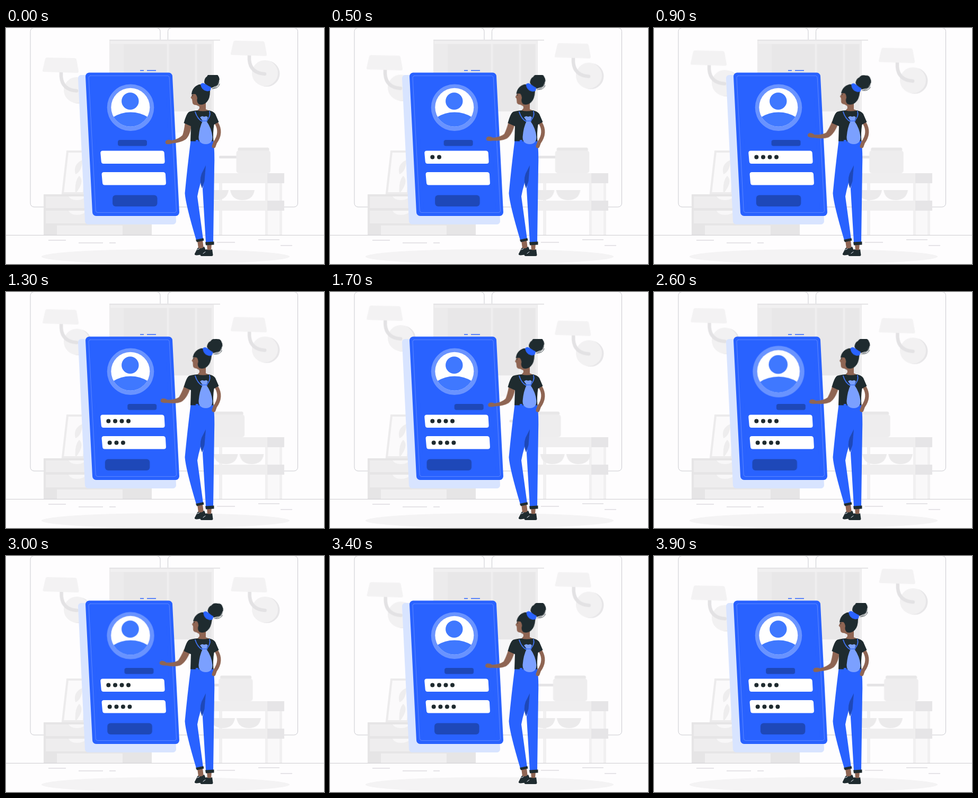
An HTML page without scripts that plays this animation: 600x447 px, repeating every 4000 ms.

```html
<!DOCTYPE html>
<html lang="en">
<head>
<meta charset="utf-8">
<title>Sign-in illustration</title>
<style>
  html, body { margin: 0; width: 100%; height: 100%; overflow: hidden; background: #fefdfe; }
  svg { display: block; width: 100%; height: 100%; }
  :root { --blue: #2962ff; --navy: #1e48b8; --ink: #1f2b2f; --skin: #8f6553; }

  .slide, .bow, .arm, .head, .bun {
    animation: 2s cubic-bezier(.37, 0, .63, 1) infinite alternate;
  }
  .slide { animation-name: slide; }
  .bow { animation-name: bow; animation-duration: 1s; }
  .arm, .head, .bun { animation-name: turn; animation-duration: 1s; }
  .arm { --turn: 16.6deg; transform-origin: 346px 172px; }
  .head { --turn: 7deg; transform-origin: 370px 150px; }
  .bun { --turn: 4deg; transform-origin: 379px 112px; }
  .avatar { transform-origin: 235px 150.8px; animation: pulse 4s ease-in-out infinite; }

  @keyframes slide { to { transform: translate(var(--x, 0px), var(--y, 0px)); } }
  @keyframes bow { to { transform: translateX(1.5px); } }
  @keyframes turn { to { transform: rotate(var(--turn)); } }
  @keyframes pulse { 0%, 52.5%, 77.5%, 100% { transform: scale(1); } 65% { transform: scale(1.1); } }

  .blue { fill: var(--blue); }
  .navy { fill: var(--navy); }
  .ink { fill: var(--ink); }
  .skin { fill: var(--skin); }
  .line { fill: none; stroke-linecap: round; stroke-linejoin: round; }
</style>
</head>
<body>
<svg viewBox="0 0 600 447" preserveAspectRatio="none">
  <defs>
    <g id="lamp">
      <circle cx="492" cy="86.500" r="24.500" fill="#e7e6e8"/>
      <circle cx="488.500" cy="85.500" r="24.500" fill="#f2f1f2"/>
      <g class="bow">
        <path class="line" d="M459 51V60Q461 85 488 87" stroke="#e3e2e4" stroke-width="6.500"/>
        <path d="M432 24L484 25Q487 25 488 28L492 50Q492 53 489 53L427 51Q423 51 424 48L429 26Q430 24 432 24Z" fill="#f3f2f3"/>
      </g>
    </g>
    <path id="bowl" d="M0 0H46Q43 19 23 19Q3 19 0 0Z" fill="#ebeaeb"/>
    <path id="field" d="M4.500 0H116Q120.500 0 120.700 4.500L121.600 20Q121.800 24.500 117.500 24.500H6Q2 24.500 1.700 20L.3 4.500Q0 0 4.500 0Z" fill="#fff"/>
    <clipPath id="disc"><circle cx="234.800" cy="150.300" r="36.500"/></clipPath>
    <clipPath id="top"><path d="M320 89H440V447H320Z"/></clipPath>
  </defs>

  <!-- room -->
  <g fill="#fefdfe" stroke="#cacacf">
    <rect x="46" y="-.5" width="245" height="339.500" rx="7"/>
    <rect x="305.500" y="-.5" width="245" height="339.500" rx="7"/>
  </g>
  <path d="M302 156H390V198H302Z" fill="#f8f7f8"/>
  <path d="M195 22H392V158H195Z" fill="#ecebec"/>
  <path d="M195 22H404V24H195Z" fill="#e5e4e6"/>
  <path d="M197 25H391V30H197Z" fill="#f1f0f1"/>
  <path d="M222 31H303V158H222ZM308 31H356V158H308ZM361 31H387V158H361Z" fill="#e8e7e8"/>
  <path d="M305.500 30V158M358.500 30V158M390 26V158" stroke="#f0eff0" stroke-width="2"/>

  <path d="M0 392.500H600" stroke="#cfced1" stroke-width="1.200"/>
  <path d="M80 402H113M137 407H183M195 407H207M398 406H432M476 401H516M518 412H540" stroke="#dddce0" stroke-width="1.500"/>
  <ellipse cx="301" cy="433" rx="234" ry="14" fill="#f4f3f4"/>

  <path d="M116 234H152L147 313H107Z" fill="#fbfafb" stroke="#ecebec" stroke-width="4"/>
  <path d="M144 250Q126 258 131 277Q144 271 144 250ZM131 314Q129 290 138 280Q150 290 131 314Z" fill="#eeedee"/>

  <path d="M71 315H275V392H71Z" fill="#e6e5e6"/>
  <path d="M96 374H220V392H96Z" fill="#f0eff0"/>
  <path d="M75 319H215V341H75ZM75 346H215V370H75ZM222 319H272V370H222Z" fill="#eeedee"/>
  <path d="M118 319H150Q146 326 134 326Q122 326 118 319ZM118 346H152Q146 354 134 354Q122 354 118 346Z" fill="#f8f7f8"/>

  <path d="M402 294H408V392H402ZM489 294H521V392H489Z" fill="#f1f0f1"/>
  <path d="M494 294H516V392H494Z" fill="#f9f8f9"/>
  <path d="M385 275H525V294H385ZM385 327H525V346H385Z" fill="#efeeef"/>
  <path d="M493 275H525V294H493ZM493 327H525V346H493Z" fill="#e6e5e7"/>
  <g class="slide" style="--x:24px">
    <use href="#bowl" x="374" y="307"/>
    <use href="#bowl" x="423" y="307"/>
  </g>
  <g class="slide" style="--x:-67px">
    <rect x="402" y="242" width="36" height="5" rx="2" fill="#e5e4e6"/>
    <rect x="437.500" y="226.500" width="59" height="7" rx="3" fill="#e8e7e8"/>
    <rect x="434.500" y="232" width="64.500" height="43" rx="5" fill="#eeedee"/>
  </g>

  <g class="slide" style="--y:32px"><use href="#lamp"/></g>
  <g transform="translate(-355 32)">
    <g class="slide" style="--y:-32px"><use href="#lamp"/></g>
  </g>

  <!-- card -->
  <path d="M142 95H302L315 366H155Z" fill="#d8e4ff" stroke="#d8e4ff" stroke-width="12" stroke-linejoin="round"/>
  <path d="M157 91.500H307L320 349H170Z" fill="#2962ff" stroke="#2962ff" stroke-width="14" stroke-linejoin="round"/>
  <path class="line" d="M159 90.500H305Q308 90.500 308.200 94L321.500 346Q321.500 349.500 318 349.500H173Q169.500 349.500 169.200 346L156 94Q156 90.500 159 90.500Z" stroke="#7196ff" stroke-width=".7"/>
  <path d="M253 80.500H260M266 80.500H283" stroke="#2962ff" stroke-width="1.300"/>

  <g class="avatar">
    <circle cx="235" cy="150.800" r="44.300" fill="#6993ff"/>
    <circle cx="234.800" cy="150.300" r="36.500" fill="#fff"/>
    <circle cx="234.300" cy="138.500" r="16.200" fill="#3f78ff"/>
    <ellipse cx="235" cy="191.500" rx="46" ry="32" fill="#3f78ff" clip-path="url(#disc)"/>
  </g>

  <rect class="navy slide" style="--x:25px" x="211" y="212" width="55" height="11.500" rx="4"/>
  <rect class="navy slide" style="--x:-19.500px" x="201" y="316.500" width="84.500" height="21.500" rx="6"/>
  <use href="#field" x="178" y="232.400"/>
  <use href="#field" x="180.300" y="273"/>

  <g class="ink">
    <circle cx="193.300" cy="244.600" r="4"><animate attributeName="opacity" values="0;1" keyTimes="0;.065" calcMode="discrete" dur="4s" repeatCount="indefinite"/></circle>
    <circle cx="206" cy="244.600" r="4"><animate attributeName="opacity" values="0;1" keyTimes="0;.106" calcMode="discrete" dur="4s" repeatCount="indefinite"/></circle>
    <circle cx="218.500" cy="244.600" r="4"><animate attributeName="opacity" values="0;1" keyTimes="0;.147" calcMode="discrete" dur="4s" repeatCount="indefinite"/></circle>
    <circle cx="231" cy="244.600" r="4"><animate attributeName="opacity" values="0;1" keyTimes="0;.188" calcMode="discrete" dur="4s" repeatCount="indefinite"/></circle>
    <circle cx="195.700" cy="285.400" r="4"><animate attributeName="opacity" values="0;1" keyTimes="0;.23" calcMode="discrete" dur="4s" repeatCount="indefinite"/></circle>
    <circle cx="208.400" cy="285.400" r="4"><animate attributeName="opacity" values="0;1" keyTimes="0;.271" calcMode="discrete" dur="4s" repeatCount="indefinite"/></circle>
    <circle cx="220.900" cy="285.400" r="4"><animate attributeName="opacity" values="0;1" keyTimes="0;.312" calcMode="discrete" dur="4s" repeatCount="indefinite"/></circle>
    <circle cx="233.400" cy="285.400" r="4"><animate attributeName="opacity" values="0;1" keyTimes="0;.353" calcMode="discrete" dur="4s" repeatCount="indefinite"/></circle>
  </g>

  <!-- woman -->
  <path class="skin" d="M361 402H371L373 418H363ZM379 408H388L387 422H380Z"/>
  <path class="ink" d="M362 416Q368 420 374 414L377 421L371 429L360 430.500Q355 430.500 356 427.500ZM378 419Q384 422 389 419L390.500 430Q390.500 432 388 432H369Q365 431.500 368 428Z"/>
  <path class="line" d="M361 420L365 418M372 427L376 424" stroke="#eef2ff"/>

  <path class="blue" d="M348.500 213H391.500Q394 235 393 265L391 406H377L371 305L376 268Q365 296 361 319L372 400L359 402Q339 335 337.500 313Q342 265 348.500 213Z"/>
  <path class="navy" d="M377 260L374.500 290L370 304Q364 290 369 276Z"/>
  <path class="ink" d="M358 401L372.500 398L373.500 402.500L360 405.500ZM376 405.500L392.500 404.500V410.500L377 411.500Z"/>

  <path class="skin arm" d="M338 178L350 182Q348 203 339 211Q330 217 314 218.500Q306 221 302 219.500Q299 216 303 212.500Q308 211 313 213Q327 209.500 333 203Q336 195 338 178Z"/>
  <path class="line" d="M397 180Q408 198 394.500 217L392 224" stroke="#8f6553" stroke-width="7"/>
  <path class="skin" d="M364 140H377V154Q383 156 383 158Q371 161 360 158L365 152Z"/>
  <path class="ink" d="M361 156Q371 159 383 156Q392 158 395 163L401.500 178L392.500 183Q390 200 391.500 214.500H348L349 186L335.500 180Q340 163 345 159Q351 157 361 156Z"/>
  <path class="line" d="M357 159Q361 172 370 177M384 158Q387 167 378 176" stroke="#3f73f2" stroke-width="1.800"/>
  <path class="blue" d="M358 212H363V217H358Z"/>
  <path d="M366 169L370 167L374 168L378 167L381 169L378 176Q388 190 389.500 206Q390 219.500 377 220Q363 219.500 363.500 206Q365 188 371 176Z" fill="#7ba0ff"/>
  <path class="line" d="M369 176H380" stroke="#3f73f2" stroke-width="1.500"/>

  <g clip-path="url(#top)">
    <g class="head">
      <path class="skin" d="M353 121Q351 124 351 127L348.500 132L351 135L352 142Q353 146 359 146L368 150L372 130Z"/>
      <path class="ink" d="M350 126Q351 112 364 107Q382 105 385 119Q385 134 379 140Q373 147 364 144.500Q359 140 361 133Q360 127 357 125Q353 125 350 126ZM350 128L353 127V129Z"/>
      <g class="bun">
        <path class="line" d="M389 115Q401 115 403 106M392 113Q401 111 402 101" stroke="#1f2b2f" stroke-width=".9"/>
        <path class="ink" d="M374 103Q374 95 379 92Q382 85 390 86Q397 84 400 90Q405 96 401 102Q400 110 393 111Q388 115 380 113Z"/>
      </g>
      <path class="blue" d="M367 107Q370 102 376 106Q382 110 387 112L386 118Q381 121 377 119Q369 117 367 107Z"/>
    </g>
  </g>
</svg>
</body>
</html>
```
